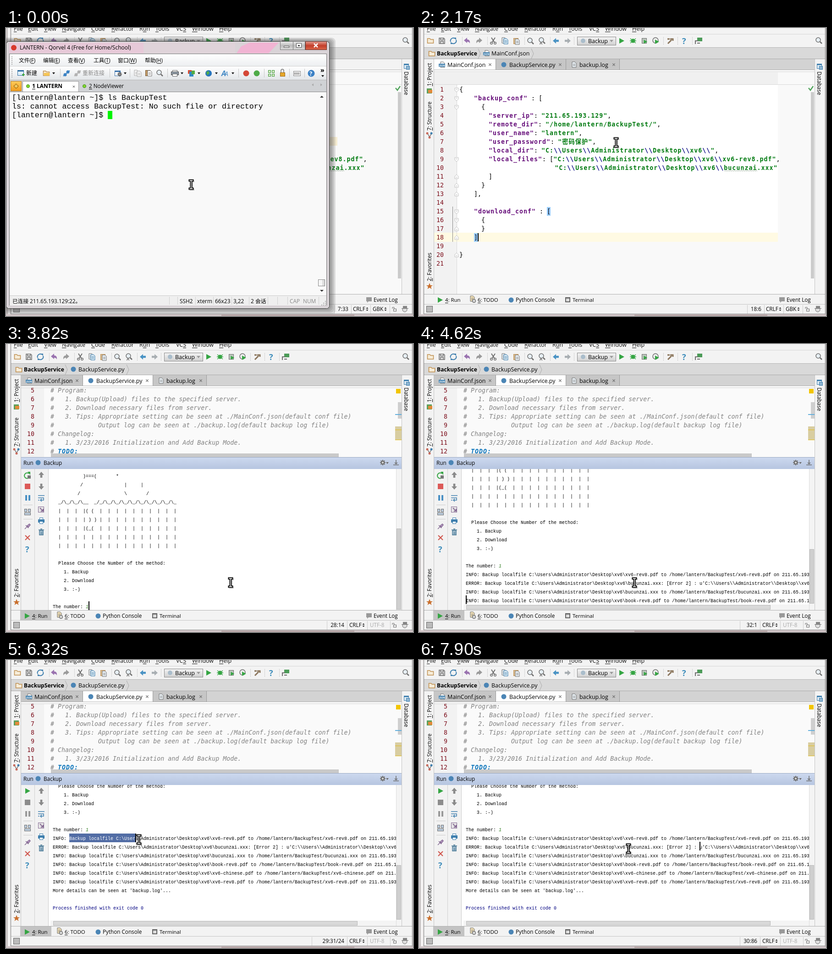
These frames come from a looping animation (888x629 px, 8 s). An HTML page with a canvas:

```html
<!DOCTYPE html>
<html lang="en">
<head>
<meta charset="utf-8">
<title>Backup demo</title>
<style>
html,body{margin:0;width:100%;height:100%;overflow:hidden}
canvas{display:block}
</style>
</head>
<body>
<canvas id="stage" width="888" height="629"></canvas>
<script>
const c = document.getElementById('stage').getContext('2d');
const ui = (px, style = '') => `${style} ${px}px "Open Sans","Noto Sans CJK SC",sans-serif`;
const mono = (style = '') => `${style} 13.3px "DejaVu Sans Mono","Noto Sans CJK SC",monospace`;
const term = '16.6px "Liberation Mono",monospace';
const small = (style = '') => `${style} 10px "Liberation Mono",monospace`;
const IP = '211.65.193.129', USER = 'lantern';

// ---- drawing helpers ----
function R(x, y, x2, y2, fill, line) {
  if (fill) { c.fillStyle = fill; c.fillRect(x, y, x2 - x, y2 - y); }
  if (line) { c.strokeStyle = line; c.lineWidth = 1; c.strokeRect(x + .5, y + .5, x2 - x - 1, y2 - y - 1); }
}
const H = (x, x2, y, col) => R(x, y, x2, y + 1, col);
const V = (x, y, y2, col) => R(x, y, x + 1, y2, col);
function T(s, x, y, font = ui(11.7), col = '#000', mark = -1) {
  c.font = font; c.fillStyle = col;
  c.fillText(s, x, y);
  const w = c.measureText(s).width;
  if (mark >= 0) H(x + c.measureText(s.slice(0, mark)).width, x + c.measureText(s.slice(0, mark + 1)).width, y + 2, col);
  return w;
}
function P(d, x, y, fill, line, w = 1.5, turn = 0) {
  const path = new Path2D(d);
  c.save(); c.translate(x, y); c.rotate(turn);
  if (fill) { c.fillStyle = fill; c.fill(path); }
  if (line) { c.strokeStyle = line; c.lineWidth = w; c.stroke(path); }
  c.restore();
}
function O(x, y, r, fill, line, w = 1.5) {
  c.beginPath(); c.arc(x, y, r, 0, 7);
  if (fill) { c.fillStyle = fill; c.fill(); }
  if (line) { c.strokeStyle = line; c.lineWidth = w; c.stroke(); }
}
function round(x, y, x2, y2, r, fill, line) {
  c.beginPath(); c.roundRect(x, y, x2 - x, y2 - y, r);
  if (fill) { c.fillStyle = fill; c.fill(); }
  if (line) { c.strokeStyle = line; c.lineWidth = 1; c.stroke(); }
}
function G(y, y2, ...cols) {
  const g = c.createLinearGradient(0, y, 0, y2);
  cols.forEach((k, i) => g.addColorStop(i / (cols.length - 1), k));
  return g;
}
function turned(s, x, y, angle, mark) {
  c.save(); c.translate(x, y); c.rotate(angle);
  T(s, 0, 4, ui(11.7), '#000', mark);
  c.restore();
}
function clip(x, y, x2, y2, fn) {
  c.save(); c.beginPath(); c.rect(x, y, x2 - x, y2 - y); c.clip(); fn(); c.restore();
}

// ---- icons ----
const BLUE = '#3f7fae', GRAY = '#6e6e6e', GREEN = '#35a543', TAN = '#c09050';
const folder = (x, y) => P('M-6.5-5h5l2 2h6v8h-13z', x, y, '#f6ecd8', TAN);
const play = (x, y, s = 1) => P(`M${-5 * s} ${-6 * s}L${6 * s} 0L${-5 * s} ${6 * s}z`, x, y, GREEN);
const arrow = (x, y, turn, col) => P('M-7 0L0-6V-2.3H6V2.3H0V6z', x, y, col, null, 0, turn);
const page = (x, y, fill = '#e9f0f5', col = GRAY) => P('M-4-6h6l3 3v9h-9zM-2-1h5M-2 2h5', x, y, fill, col, 1);
const lens = (x, y, col = GRAY) => { P('M3 3L7 7', x, y, null, col, 2.5); O(x - 1, y - 1, 5, '#e6eef3', col); };
const cross = (x, y, r, col, w) => P(`M${-r} ${-r}L${r} ${r}M${r} ${-r}L${-r} ${r}`, x, y, null, col, w);
const py = (x, y, r = 5.5, col = '#4b85b5') => O(x, y, r, col);
const jsonFile = (x, y) => { page(x + 1, y, '#f4f4f4'); R(x - 7, y - 2, x + 7, y + 5, BLUE); T('JSON', x - 6, y + 4, ui(5, 'bold'), '#fff'); };
const gear = (x, y, r = 4) => {
  for (let i = 0; i < 8; i++) P(`M0 0V${-r - 2}`, x, y, null, GRAY, 2, i * Math.PI / 4);
  O(x, y, r - 1, '#ddd', GRAY, 2);
};

const MENU = [['File', 17], ['Edit', 48], ['View', 83], ['Navigate', 122], ['Code', 186], ['Refactor', 230],
  ['Run', 291], ['Tools', 326], ['VCS', 371], ['Window', 406], ['Help', 465]];

function toolbar() {
  for (const [s, x] of MENU) T(s, x, 6, ui(12.5), '#111', s === 'Run' ? 1 : s === 'VCS' ? 2 : 0);
  H(11, 886, 13, '#d5d5d5');
  folder(25, 28);
  P('M-6-6h10l2 2v10h-12zM-3-6v4h6v-4M-3 6v-5h6v5', 50, 28, '#e6e6e6', GRAY);
  P('M-6 2A6 6 0 0 1 3-5M6-2A6 6 0 0 1-3 5', 75, 28, null, BLUE, 2);
  P('M1-7h5v5zM-1 7h-5v-5z', 75, 28, BLUE);
  const undo = 'M-7-1L0-7V-3Q7-3 6 6Q5 2 0 2V5z';
  P(undo, 105, 28, '#9a73b0');
  c.save(); c.translate(131, 28); c.scale(-1, 1); P(undo, 0, 0, '#9b9b9b'); c.restore();
  P('M-4-7L3 4M4-7L-3 4', 162, 28, null, GRAY, 2); O(158, 33, 2.3, null, GRAY); O(166, 33, 2.3, null, GRAY);
  page(185, 27); page(189, 29, '#d5e6f0', BLUE);
  R(206, 22, 217, 35, '#d9bd92', TAN); page(214, 30);
  lens(243, 28); lens(268, 27); T('A', 263, 36, ui(9, 'bold'), GRAY);
  arrow(299, 28, 0, '#4a93c4'); arrow(324, 28, Math.PI, '#a8aeb2');
  R(345, 19, 430, 38, G(19, 38, '#f4f4f4', '#cfcfcf'), '#8a8a8a');
  py(358, 28, 5, '#aabdcb'); T('Backup', 369, 33, ui(12.5));
  P('M-4-2h8l-4 5z', 420, 28, '#999');
  play(442, 28);
  const bug = (x, col) => { P('M-6-5L6 5M-6 5L6-5M-7 0H7', x, 28, null, col); O(x, 28, 4.5, col); };
  bug(467, GREEN);
  R(486, 22, 497, 34, '#bcc5bd', GRAY); play(494, 30, .7);
  O(516, 27, 6, '#eee', GRAY); play(519, 30, .8);
  P('M-5 6L3-2M0-4h6v4M-6-4h5', 548, 28, null, '#8a755b', 3);
  T('?', 574, 35, ui(18, 'bold'), '#3e8dbb');
  R(607, 21, 618, 29, '#4c9b58'); P('M-6 7v-7h6M-2 5h6', 609, 28, null, GRAY, 2);
  for (const x of [94, 149, 230, 286, 338, 533, 564, 596])
    for (let y = 20; y < 38; y += 3) R(x, y, x + 1, y + 1, '#999');
  lens(872, 27);
}

function frame(pyMode, strip) {
  R(0, 0, 888, 629, '#e6dfe0');
  V(2, 0, 629, '#8d8585'); R(3, 0, 10, 629, '#f1efef'); V(10, 0, 626, '#777');
  R(0, 625, 888, 629, '#d4c8ca'); R(470, 626, 760, 629, '#b9a7a8');
  R(11, 0, 886, 625, '#f3f3f3'); V(886, 0, 626, '#777'); H(11, 887, 624, '#888');
  toolbar();
  R(11, 43, 886, 68, '#d9d9d9'); H(11, 886, 42, '#b5b5b5'); H(11, 886, 67, '#aaa');
  folder(28, 56); T('BackupService', 39, 60, ui(12.1, 'bold'));
  const chevron = x => P('M-2-11L3 0L-2 11', x, 56, null, '#aaa', 1);
  chevron(131);
  pyMode ? py(147, 55) : jsonFile(147, 55);
  T(pyMode ? 'BackupService.py' : 'MainConf.json', 158, 60, ui(12.4));
  chevron(pyMode ? 265 : 247);
  // tabs
  R(33, 68, 863, 92, strip);
  [['MainConf.json', 33, 62, 167, jsonFile], ['BackupService.py', 168, 197, 320, py], ['backup.log', 321, 350, 437, page]]
    .forEach(([s, x, tx, x2, icon], i) => {
      const on = i === +pyMode;
      R(x, 68, x2 + 1, 92, on ? '#fff' : '#c6c6c6'); V(x2, 68, 92, '#999');
      icon(tx - 12, 80);
      T(s, tx, 85, ui(12.4)); cross(x2 - 12, 80, 2.6, GRAY, 1.3);
    });
  H(33, 863, 91, '#b0b0b0'); R(33, 92, 863, 96, '#fff'); H(33, 863, 95, '#ccc');
  // side stripes
  V(32, 68, 582, '#c4c4c4'); V(863, 68, 582, '#c4c4c4');
  turned('1: Project', 23, 127, -Math.PI / 2, 0); turned('7: Structure', 23, 224, -Math.PI / 2, 0);
  turned('2: Favorites', 23, 553, -Math.PI / 2, 0); turned('Database', 873, 95, Math.PI / 2);
  R(17, 132, 28, 143, '#5aa05a'); R(20, 135, 29, 142, '#e28a3a');
  P('M-4-3L0 4L4-3', 23, 234, null, GRAY); O(18, 230, 2.5, '#c96a5b'); O(27, 230, 2.5, BLUE); O(23, 239, 2.5, '#c96a5b');
  P('M0-7L2-2H7L3 1L4.500 6L0 3L-4.500 6L-3 1L-7-2H-2z', 23, 564, '#c96f2d');
  R(868, 78, 879, 89, '#dbe9f3', BLUE); R(868, 78, 879, 81, BLUE); R(873, 83, 881, 91, '#8fb6d2', BLUE);
  // bottom bars
  H(11, 886, 581, '#b0b0b0'); H(11, 886, 603, '#c4c4c4');
  if (pyMode) R(31, 582, 99, 603, '#c3c3c3');
  play(46, 594); T('4: Run', 57, 598, ui(11.4), '#000', 0);
  page(116, 591, '#f0dfb5'); O(120, 596, 3.5, '#ddd', GRAY); T('6: TODO', 128, 598, ui(11.4), '#000', 0);
  py(201, 594); T('Python Console', 211, 598);
  R(319, 588, 330, 599, '#777', '#555'); R(321, 591, 328, 597, '#ddd'); T('Terminal', 335, 598, ui(11.5));
  P('M-6-5h12v9h-7l-3 3v-3h-2z', 792, 593, '#999'); T('Event Log', 802, 598);
  R(16, 607, 30, 621, '#bbb', '#666');
}

function status(pos, right, enc, sep) {
  c.textAlign = 'right'; T(pos, right, 618); c.textAlign = 'left';
  for (const x of sep) V(x, 605, 624, '#ccc');
  const updown = x => P('M-2.500-1L0-4L2.500-1zM-2.500 1L0 4L2.500 1z', x, 614, '#222');
  const grey = enc === 'UTF-8', left = grey ? 749 : 757;
  T('CRLF', left, 618); updown(left + 31);
  T(enc, grey ? 794 : 800, 618, ui(11.7), grey ? '#aaa' : '#000');
  if (!grey) updown(828);
  P('M-1 0v-3h-4v3', 848, 613, null, GRAY, 1); R(845, 613, 852, 619, '#eee', GRAY);
  O(870, 615, 5, '#ddd', GRAY, 1); R(866, 607, 875, 612, '#888'); R(863, 612, 878, 613, GRAY);
}

// ---- JSON editor ----
const DESK = 'C:\\\\Users\\\\Administrator\\\\Desktop\\\\xv6\\\\';
const JSON_LINES = ['{', '    "backup_conf" : [', '      {', `        "server_ip": "${IP}",`,
  `        "remote_dir": "/home/${USER}/BackupTest/",`, `        "user_name": "${USER}",`,
  '        "user_password": "密码保护",', `        "local_dir": "${DESK}",`,
  `        "local_files": ["${DESK}xv6-rev8.pdf",`, `${' '.repeat(26)}"${DESK}bucunzai.xxx"`,
  '        ]', '      }', '    ],', '', '    "download_conf" : [', '      {', '      }', '    ]', '', '}', ''];
const lineNo = (n, right, y) => { c.textAlign = 'right'; T(n, right, y, mono(), '#7d0f1c'); c.textAlign = 'left'; };

function codeLine(line, y) {
  let x = 88;
  for (const m of line.matchAll(/"[^"]*"(?=\s?:)|\\\\|"|[^"\\]+/g)) {
    const s = m[0], before = line.slice(0, m.index);
    const key = s.length > 1 && s[0] === '"';
    const inside = s === '"' || (before.match(/"/g) || []).length % 2;
    const bold = key || inside;
    c.letterSpacing = bold ? '1px' : '0px';
    x += T(s, x, y, mono(bold ? 'bold' : ''), key ? '#660e7a' : s === '\\\\' ? '#000080' : inside ? '#007a10' : '#000');
  }
  c.letterSpacing = '0px';
}

function jsonEditor(t) {
  R(33, 96, 863, 581, '#f9f9f9');
  R(33, 124, 83, 581, '#f2f2f2');
  if (t < 1090) R(33, 238, 723, 257, '#f5ecd2');
  if (t >= 1540) {
    R(33, 97, 783, 123, '#f0f0f0');
    R(84, 124, 783, 447, '#fff');
    R(33, 447, 783, 467, '#fffae3');
    V(73, 390, 467, '#888');
  }
  H(33, 863, 123, '#d8d8d8');
  V(82, 124, 581, '#dadada');
  if (t >= 1090) { R(279, 391, 287, 410, '#99ccff'); R(120, 448, 128, 467, '#99ccff'); }
  JSON_LINES.forEach((line, i) => {
    const y = 139 + 19 * i;
    lineNo(i + 1, 54, y); codeLine(line, y);
    if ([1, 2, 3, 9, 15, 16].includes(i + 1)) P('M-4-4h8v5l-4 4l-4-4zM-2-1h4', 82, y - 4, '#fff', '#c0c0c0', 1);
    if ([11, 12, 13, 17, 18, 20].includes(i + 1)) P('M-4 4h8v-5l-4-4l-4 4zM-2 1h4', 82, y - 4, '#fff', '#c0c0c0', 1);
  });
  for (let x = 666; x < 737; x += 4) P('M0 2l2-2l2 2', x, 311, null, '#a9b9a9', 1);
  if (t >= 1090 && t < 2590) R(128, 448, 130, 466, '#000');
  if (t >= 1240 && t < 1540) { R(36, 99, 127, 120, '#ffffd9', '#555'); T('backup_conf', 38, 114, mono(), '#4a3a1c'); }
  R(855, 140, 862, 547, '#cbcbcb');
  P('M-5-1L-1 4L5-5', 855, 132, null, '#4fa35a', 2.5);
  status(t < 1090 ? '7:33' : '18:6', 747, 'GBK', [716, 753, 795, 837]);
}

// ---- Python editor and console ----
const COMMENTS = ['# Program:', '#   1. Backup(Upload) files to the specified server.',
  '#   2. Download necessary files from server.',
  '#   3. Tips: Appropriate setting can be seen at ./MainConf.json(default conf file)',
  '#            Output log can be seen at ./backup.log(default backup log file)',
  '# Changelog:', '#   1. 3/23/2016 Initialization and Add Backup Mode.', '# '];
const at = (...parts) => parts.reduce((s, [col, p]) => s.padEnd(col) + p, '');
const bars = mid => at([2, '|  |  |  |' + mid], [17, '|  '.repeat(10)]);
const info = f => `INFO: Backup localfile C:\\Users\\Administrator\\Desktop\\xv6\\${f} to /home/${USER}/BackupTest/${f} on ${IP}`;
const CONSOLE = [
  at([11, ')===('], [23, '*']), at([10, '/'], [26, '|'], [32, '|']), at([9, '/'], [26, '\\'], [34, '/']),
  at([2, '_/\\_/\\_/\\__'], [15, '_/' + '_/\\'.repeat(9) + '_']),
  bars('( ('), bars(' ) )'), bars('(_('), bars('  |'), bars('  |'), '',
  '  Please Choose the Number of the method:', '    1. Backup', '    2. Download', '    3. :-)', '', 'The number: ',
  info('xv6-rev8.pdf'),
  `ERROR: Backup localfile C:\\Users\\Administrator\\Desktop\\xv6\\bucunzai.xxx: [Error 2] : u'${DESK}bucunzai.xxx'`,
  info('bucunzai.xxx'), info('book-rev8.pdf'), info('xv6-chinese.pdf'), info('xv6-rev8.pdf'),
  "More details can be seen at 'backup.log'...", '', 'Process finished with exit code 0', ''];
const PROMPT = 15, DONE = 25;
const SHOWN = [[3690, PROMPT], [4070, 18], [4620, 19], [4750, 20], [4900, 21], [5050, 22], [5200, DONE]];
const latest = (list, t) => list.filter(k => k[0] <= t).pop();
const DRAG = 6150, CLICK = 7350;

function consoleText(t, mouse) {
  const last = latest(SHOWN, t)[1], bottom = t < 4070 ? 573 : 560;
  const dragging = t >= DRAG && t < CLICK;
  const col = Math.floor((mouse[1] - 105) / 6), second = mouse[2] > 399;
  const caret = (x, y) => R(x, y - 11, x + 2, y + 8, '#000');
  const lines = colour => {
    for (let i = 0; i <= last; i++) {
      const y = bottom - 19 * (last - i);
      if (y < 260) continue;
      const w = T(CONSOLE[i], 102, y + 4, small(), colour || (i === DONE - 1 ? '#000080' : '#000'));
      if (i === PROMPT && t >= 3820) T('1', 102 + w, y + 4, small('italic'), '#2c7a1c');
    }
  };
  clip(97, 273, 851, 581, () => {
    lines();
    if (dragging) {
      const end = 102 + 6 * col;
      const boxes = second ? [[138, 379, 851, 398], [102, 398, end, 417]] : [[138, 379, Math.max(138, end), 398]];
      for (const b of boxes) clip(...b, () => { R(...b, '#526da5'); lines('#fff'); });
      caret(end, second ? 409 : 390);
    } else if (t >= CLICK) caret(612, 408);
    else if (t < 4070) caret(t < 3820 ? 174 : 180, 573);
    else caret(102, bottom);
  });
  let pos = t < 3820 ? '28:13' : t < 4070 ? '28:14' : t < 5200 ? `${last + 13}:1` : '38:1';
  if (dragging) pos = second ? `30:${col + 1}/${128 + col}` : `29:${col + 1}/${Math.max(0, col - 6)}`;
  if (t >= CLICK) pos = '30:86';
  status(pos, 738, 'UTF-8', [dragging ? 667 : 700, 744, 788, 838]);
}

function runIcons(stopped) {
  if (stopped) play(47, 286);
  else { P('M4-4A6 6 0 1 0 5 4', 46, 287, null, GREEN, 2); P('M1-8h6v7z', 46, 287, GREEN); R(47, 287, 54, 294, '#777'); }
  R(41, 305, 53, 317, stopped ? '#8c8c8c' : '#dc5a58');
  for (const x of [42, 49]) R(x, 330, x + 4, 342, stopped ? '#999' : '#4a90c4');
  R(40, 360, 46, 367, '#bcd', GRAY); R(48, 360, 54, 367, '#bcd', GRAY); R(40, 368, 54, 374, '#bcd', GRAY);
  P('M-6 6L-1 1M-4-2L2 4M-1-1L4-5L6-3L2 2z', 47, 398, '#b79ac4', '#866b94');
  cross(47, 423, 5, '#d1584f', 2.2);
  T('?', 42, 455, ui(18, 'bold'), '#3e8dbb');
  arrow(77, 286, Math.PI / 2, '#8a8a8a'); arrow(77, 311, -Math.PI / 2, '#8a8a8a');
  P('M-7-5H7M-7 0H5V5H-1M-7 5H-4M1 2L-2 5L1 8', 77, 336, null, BLUE);
  R(70, 355, 83, 368, '#e6e6e6', '#866b94'); P('M-3-3L4 4M4-1V4H-1', 77, 361, null, '#866b94', 2);
  R(70, 383, 84, 390, BLUE); R(73, 379, 81, 384, '#fff', BLUE); R(73, 387, 81, 393, '#fff', BLUE);
  P('M-6-5H6M-2-7H2M-4-3V6H4V-3zM-1-1V5M1.500-1V5', 77, 411, '#d8e5ed', '#3f7190');
  V(62, 273, 581, '#d0d0d0'); V(92, 273, 581, '#ccc');
  for (const y of [351, 382]) H(38, 58, y, '#ccc');
}

function pyEditor(t, mouse) {
  R(33, 96, 863, 247, '#fafafa');
  R(33, 96, 83, 247, '#f2f2f2');
  clip(33, 96, 850, 247, () => {
    COMMENTS.forEach((s, i) => {
      const y = 106 + 19 * i;
      lineNo(i + 5, 62, y); T(s, 97, y, mono('italic'), '#808080');
    });
    c.letterSpacing = '1px'; T('TODO:', 113, 239, mono('italic bold'), '#0a74bb'); c.letterSpacing = '0px';
  });
  R(98, 239, 726, 247, 'rgba(185,185,185,.75)');
  R(851, 98, 861, 108, '#f2c500'); R(855, 127, 863, 163, '#cfcfcf');
  R(849, 153, 863, 155, '#63aedb'); R(849, 180, 863, 210, '#d8cda0');
  H(849, 863, 187, '#e3bd22'); H(849, 863, 209, '#e3bd22');
  // run panel
  R(33, 247, 863, 273, G(247, 273, '#cdd9ef', '#b6c5e0')); H(33, 863, 247, '#9aa9c4');
  T('Run', 38, 264); py(70, 259); T('Backup', 82, 264);
  gear(822, 259); P('M-3-1h6l-3 4z', 832, 259, GRAY);
  P('M0-6V3M-3 0L0 3L3 0M-6 5H6', 851, 259, null, GRAY);
  R(33, 273, 93, 581, '#f2f2f2'); R(93, 273, 863, 581, '#fff');
  runIcons(t >= 5350);
  R(851, 273, 863, 581, '#f4f4f4'); V(851, 273, 581, '#ddd');
  if (t < 4070) R(852, 403, 862, 580, '#cfcfcf', '#bbb');
  else { R(852, 448, 862, 567, '#cfcfcf', '#bbb'); R(97, 569, 851, 581, '#f4f4f4'); R(103, 570, 767, 580, '#d8d8d8', '#bbb'); }
  consoleText(t, mouse);
}

// ---- terminal window ----
function terminal() {
  for (let i = 0; i < 4; i++) round(-8 + 2 * i, 21 + 2 * i, 719 - 3 * i, 625 - 3 * i, 9, 'rgba(60,60,60,.14)');
  round(.5, 29.5, 705.5, 612.5, 6, '#d9d3d7', '#333');
  round(1.5, 30.5, 704.5, 611.5, 5, null, '#f4f0f2');
  R(7, 32, 300, 55, '#e7c9d8'); R(300, 32, 500, 55, '#dfd3d9');
  P('M0 23L10 8L28 0H92L70 23z', 503, 32, '#f1b4d3');
  O(17, 43, 6, '#d8392d');
  T('LANTERN - Qorvel 4 (Free for Home/School)', 30, 47, ui(12));
  R(598, 29, 653, 48, G(29, 48, '#eee', '#bbb', '#ddd'), '#777'); V(626, 30, 47, '#777');
  R(653, 29, 700, 48, G(29, 48, '#e5a296', '#c33f2b', '#d9684c'), '#6b2b22');
  R(606, 39, 618, 43, '#fff', '#555'); R(633, 33, 645, 43, '#fff', '#555'); R(637, 37, 641, 40, '#555');
  cross(676, 38, 4, '#fff', 2.5);
  R(7, 56, 700, 606, '#f3f3f3', '#777');
  R(8, 57, 699, 84, G(57, 84, '#fff', '#eceef0')); H(8, 699, 83, '#d0d0d0');
  [['文件(F)', 28], ['编辑(E)', 81], ['查看(V)', 135], ['工具(T)', 191], ['窗口(W)', 244], ['帮助(H)', 303]]
    .forEach(([s, x]) => T(s, x, 75, ui(11.7), '#000', 3));
  // toolbar
  R(8, 84, 699, 113, G(84, 113, '#fff', '#e3e6e9'));
  for (let y = 62; y < 110; y += 4) if (y < 80 || y > 88) R(12, y, 14, y + 2, '#aaa');
  const drop = (x, y = 99) => P('M-3-2h6l-3 4z', x, y, '#111');
  R(25, 92, 39, 104, '#dff0fc', '#2c6ca0'); R(25, 92, 39, 95, '#2c6ca0'); P('M0-3V3M-3 0H3', 38, 102, null, '#39a339', 2);
  T('新建', 44, 103, ui(12)); folder(88, 99); R(83, 98, 95, 104, '#f6c552'); drop(104);
  const plug = (x, col) => { P('M-7 6L7-6', x, 99, null, col, 2); O(x - 3, 102, 3.5, col); O(x + 3, 96, 3.5, col); };
  plug(132, '#3d83c4'); plug(156, '#b3b3b3'); T('重新连接', 167, 103, ui(12), '#888');
  R(237, 93, 250, 105, '#fff', '#3a72ab'); R(237, 93, 250, 96, '#3a72ab'); gear(248, 101, 3); drop(260);
  page(284, 98, '#f4f4f4', '#aaa'); page(290, 100, '#f4f4f4', '#aaa');
  R(304, 92, 315, 105, '#c29a68', '#765a36'); page(313, 99, '#fff');
  lens(335, 98); R(360, 95, 377, 103, '#8b96a1', '#555'); R(363, 92, 374, 96, '#fff', '#666'); R(363, 100, 374, 106, '#fff', '#666'); drop(384);
  R(397, 92, 405, 100, '#d94e36'); R(400, 95, 409, 106, '#318ac3'); R(405, 93, 412, 101, '#54ad43'); drop(421);
  O(442, 99, 7, '#2675bd'); P('M-5-3L0-5L2 0L-3 4z', 442, 99, '#52ad48'); drop(459);
  T('A', 470, 105, ui(16, 'italic bold'), '#468bc6'); T('A', 477, 105, ui(14, 'italic'), '#468bc6'); drop(495);
  O(524, 99, 6.5, '#d44737'); O(547, 99, 6.5, '#4eab48');
  for (const [x, y] of [[575, 95], [583, 95], [575, 103], [583, 103]]) R(x - 3, y - 3, x + 3, y + 3, '#d7edc4', '#3c9438');
  P('M-3 0v-4a3 3 0 0 1 6 0v4', 603, 97, null, '#777'); R(598, 97, 609, 106, '#e6a72a', '#9c6815');
  R(627, 94, 643, 105, '#f4f4f4', '#888'); for (let x = 629; x < 641; x += 3) R(x, 97, x + 2, 102, '#999');
  O(666, 99, 7.5, '#3a80c5'); T('?', 662, 104, ui(13, 'bold'), '#fff');
  T('»', 686, 97, ui(14, 'bold')); drop(691, 105);
  for (const x of [118, 226, 270, 352, 507, 563, 618, 651]) V(x, 89, 108, '#c7c7c7');
  // tabs
  R(8, 113, 699, 140, '#d0d2d5'); H(8, 699, 113, '#b8b8b8');
  R(10, 116, 34, 138, G(116, 138, '#ffce5e', '#f09b1c'), '#b77c20');
  P('M-5 0H5M0-5V5', 22, 127, null, '#a36300', 4); P('M-4 0H4M0-4V4', 22, 127, null, '#ffe27a', 2);
  R(36, 116, 159, 140, '#fff', '#999');
  for (const x of [48, 171]) O(x, 127, 3.5, '#83d630', '#3c8a19', 1);
  T('1 LANTERN', 57, 131, ui(12, 'bold'), '#000', 0); cross(148, 128, 2.2, '#555', 1);
  T('2 NodeViewer', 181, 131, ui(11.7), '#000', 0);
  P('M2-3L-2 0L2 3z', 669, 124, '#aaa'); P('M-2-3L2 0L-2 3z', 688, 124, '#aaa');
  // screen
  R(9, 140, 699, 584, '#f9f9f9'); H(8, 699, 139, '#888');
  const prompt = `[${USER}@${USER} ~]$ `;
  T(prompt + 'ls BackupTest', 13, 157, term);
  T('ls: cannot access BackupTest: No such file or directory', 13, 176, term);
  T(prompt, 13, 195, term);
  R(222, 181, 232, 199, '#00f400');
  P('M-4 2h8l-4-4z', 689, 150, '#333'); P('M-4-2h8l-4 4z', 689, 574, '#333');
  R(681, 549, 696, 564, '#f6f6f6', '#888'); R(690, 550, 695, 563, '#ddd');
  R(8, 584, 699, 606, '#efefef'); H(8, 699, 584, '#ccc');
  T(`已连接 ${IP}:22。`, 14, 601);
  [['SSH2', 379], ['xterm', 417], ['66x23', 456], ['3,22', 496], ['2 会话', 534], ['CAP', 619], ['NUM', 648]]
    .forEach(([s, x], i) => T(s, x, 601, ui(11.9), i > 4 ? '#888' : '#000'));
  for (const x of [356, 374, 413, 452, 492, 530, 571, 592, 614, 682]) V(x, 587, 604, '#d0d0d0');
  for (let i = 0; i < 3; i++) for (let j = 0; j <= i; j++) R(696 - 4 * j, 596 + 4 * i, 698 - 4 * j, 598 + 4 * i, '#aaa');
}

// ---- mouse pointer: time, x, y; each place is held until the next ----
const MOUSE = [[0, 404, 342], [430, 500, 400], [560, 620, 480], [690, 760, 569], [820, 810, 500], [1090, 774, 454],
  [1540, 740, 430], [1670, 660, 380], [1800, 560, 330], [1930, 480, 290], [2060, 430, 250], [2190, 400, 215], [2440, 450, 242],
  [2590, 490, 330], [2740, 530, 420], [2900, 560, 486], [3050, 640, 482], [3260, -50, -50],
  [3690, 490, 521], [4620, 470, 521], [4750, 430, 520], [4900, 400, 519], [5050, 381, 518],
  [5350, 340, 480], [5480, 300, 450], [5620, 250, 420], [5740, 200, 400], [5870, 150, 392], [6000, 137, 390],
  [6150, 180, 391], [6290, 290, 392], [6430, 420, 395], [6570, 540, 404], [6700, 620, 410], [6850, 670, 413], [6980, 708, 415],
  [7220, 660, 412], [7350, 612, 409], [7640, 590, 415], [7780, 558, 419], [7900, 457, 412]];

function pointer(x, y) {
  const beam = 'M-3-9H3M-3 9H3M0-9V9';
  c.lineCap = 'square';
  P(beam, x + 2, y + 2, null, 'rgba(0,0,0,.18)', 4);
  P(beam, x, y, null, '#000', 5);
  P(beam, x, y, null, '#fff', 1.4);
  c.lineCap = 'butt';
}

function draw(now) {
  const t = now % 8000, mouse = latest(MOUSE, t), pyMode = t >= 3690;
  frame(pyMode, t < 1090 ? '#f3f3f3' : '#d3d3d3');
  pyMode ? pyEditor(t, mouse) : jsonEditor(t);
  if (t < 1090) terminal();
  pointer(mouse[1], mouse[2]);
  requestAnimationFrame(draw);
}
requestAnimationFrame(draw);
</script>
</body>
</html>
```
